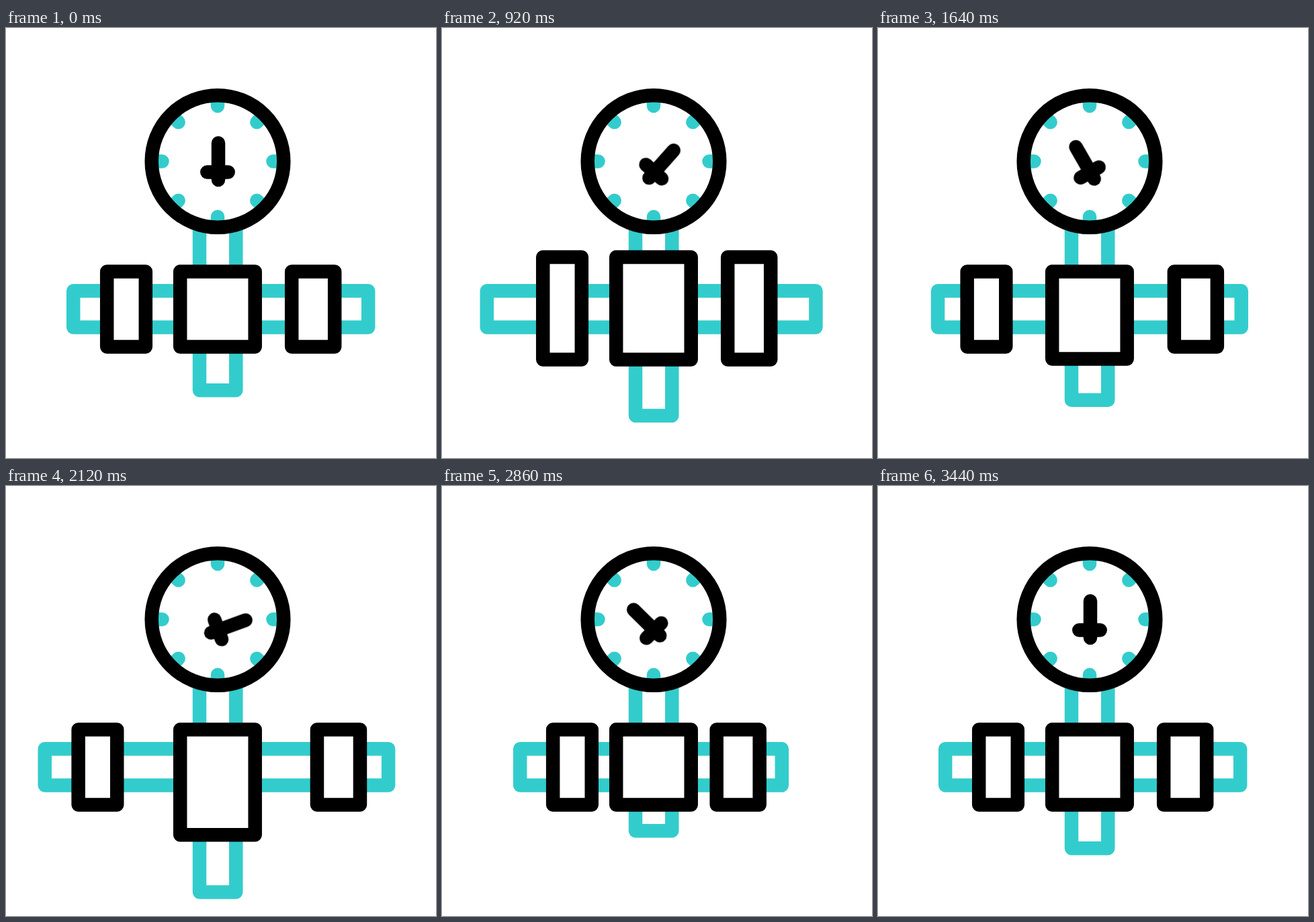
Write an HTML page without scripts that moves like this. It is 640 px wide and 640 px high and loops after 3.6 s.

```html
<!DOCTYPE html>
<html lang="en">
<head>
<meta charset="utf-8">
<title>Pressure gauge</title>
<style>
  /* Outward offsets of the moving edges, in stage pixels */
  @property --pipe-left { syntax: "<length>"; inherits: true; initial-value: 0px; }
  @property --pipe-right { syntax: "<length>"; inherits: true; initial-value: 0px; }
  @property --pipe-drop { syntax: "<length>"; inherits: true; initial-value: 0px; }
  @property --rise { syntax: "<length>"; inherits: true; initial-value: 0px; }
  @property --sink { syntax: "<length>"; inherits: true; initial-value: 0px; }
  @property --stretch { syntax: "<length>"; inherits: true; initial-value: 0px; }
  @property --flange-left { syntax: "<length>"; inherits: true; initial-value: 0px; }
  @property --flange-right { syntax: "<length>"; inherits: true; initial-value: 0px; }

  html, body { margin: 0; width: 100%; height: 100%; overflow: hidden; background: #fff; }

  svg {
    display: block;
    width: 100%;
    height: 100%;
    fill: #fff;
    stroke: #000;
    stroke-width: 20.5;
    stroke-linejoin: round;
    stroke-linecap: round;
    --ease: cubic-bezier(.333, 0, .667, 1);
    --late: cubic-bezier(.52, 0, .78, 1);
    animation: pump 3.6s var(--ease) infinite;
  }

  .teal { stroke: #33cccc; }

  .pipe {
    x: calc(100.2px - var(--pipe-left));
    width: calc(439px + var(--pipe-left) + var(--pipe-right));
  }
  .stem { height: calc(289.2px + var(--pipe-drop)); }

  .flange, .body { y: calc(362.4px - var(--rise)); }
  .flange { height: calc(112px + var(--rise) + var(--sink)); }
  .body { height: calc(112px + var(--rise) + var(--sink) + var(--stretch)); }
  .left { x: calc(150.2px - var(--flange-left)); }
  .right { x: calc(425.2px + var(--flange-right)); }

  .needle {
    transform-origin: 316px 214.5px;
    animation: swing 3.6s var(--ease) infinite;
  }

  @keyframes pump {
    0%, 5.556%, 95.556%, 100% {
      --pipe-left: 0px; --pipe-right: 0px; --pipe-drop: 0px;
      --rise: 0px; --sink: 0px; --stretch: 0px;
      --flange-left: 0px; --flange-right: 0px;
    }
    5.556% { animation-timing-function: var(--late); }
    21.667% {
      --pipe-left: 40.5px; --pipe-right: 23px; --pipe-drop: 47.2px;
      --rise: 25px; --sink: 22.3px; --stretch: 0px;
      --flange-left: 0px; --flange-right: 0px;
    }
    38.333% {
      --pipe-left: -10.2px; --pipe-right: -18.3px; --pipe-drop: -19.7px;
      --rise: 0px; --sink: 0px; --stretch: 0px;
      --flange-left: 0px; --flange-right: 0px;
    }
    55.833% {
      --pipe-left: 47px; --pipe-right: 35px; --pipe-drop: 72.5px;
      --rise: 0px; --sink: 0px; --stretch: 48.3px;
      --flange-left: 47px; --flange-right: 42px;
    }
    75% {
      --pipe-left: -18.2px; --pipe-right: -38px; --pipe-drop: -29.5px;
      --rise: 0px; --sink: 0px; --stretch: 0px;
      --flange-left: -17px; --flange-right: -18.8px;
    }
  }

  @keyframes swing {
    0%, 95.556%, 100% { transform: rotate(0deg); }
    5.556% { transform: rotate(0deg); animation-timing-function: var(--late); }
    23.056% { transform: rotate(46.5deg); }
    41.389% { transform: rotate(-47deg); }
    58.75% { transform: rotate(70deg); }
    81.25% { transform: rotate(-47.5deg); }
  }
</style>
</head>
<body>
<svg viewBox="0 0 640 640">
  <g class="teal">
    <rect class="pipe" y="391.3" height="54.2"/>
    <rect class="stem" x="288" y="250" width="54.3"/>
  </g>

  <rect class="flange left" width="57.6"/>
  <rect class="body" x="259.2" width="111.5"/>
  <rect class="flange right" width="64"/>

  <g transform="translate(315 198.5)">
    <circle r="98.3" stroke="none"/>
    <g class="teal">
      <path id="ticks" d="M0-92V-82.5M0 82.5V92"/>
      <use href="#ticks" transform="rotate(45)"/>
      <use href="#ticks" transform="rotate(90)"/>
      <use href="#ticks" transform="rotate(135)"/>
    </g>
    <circle r="98.3" fill="none"/>
  </g>
  <path class="needle" d="M316 171.3V226M299.3 214.5H330.7"/>
</svg>
</body>
</html>
```
